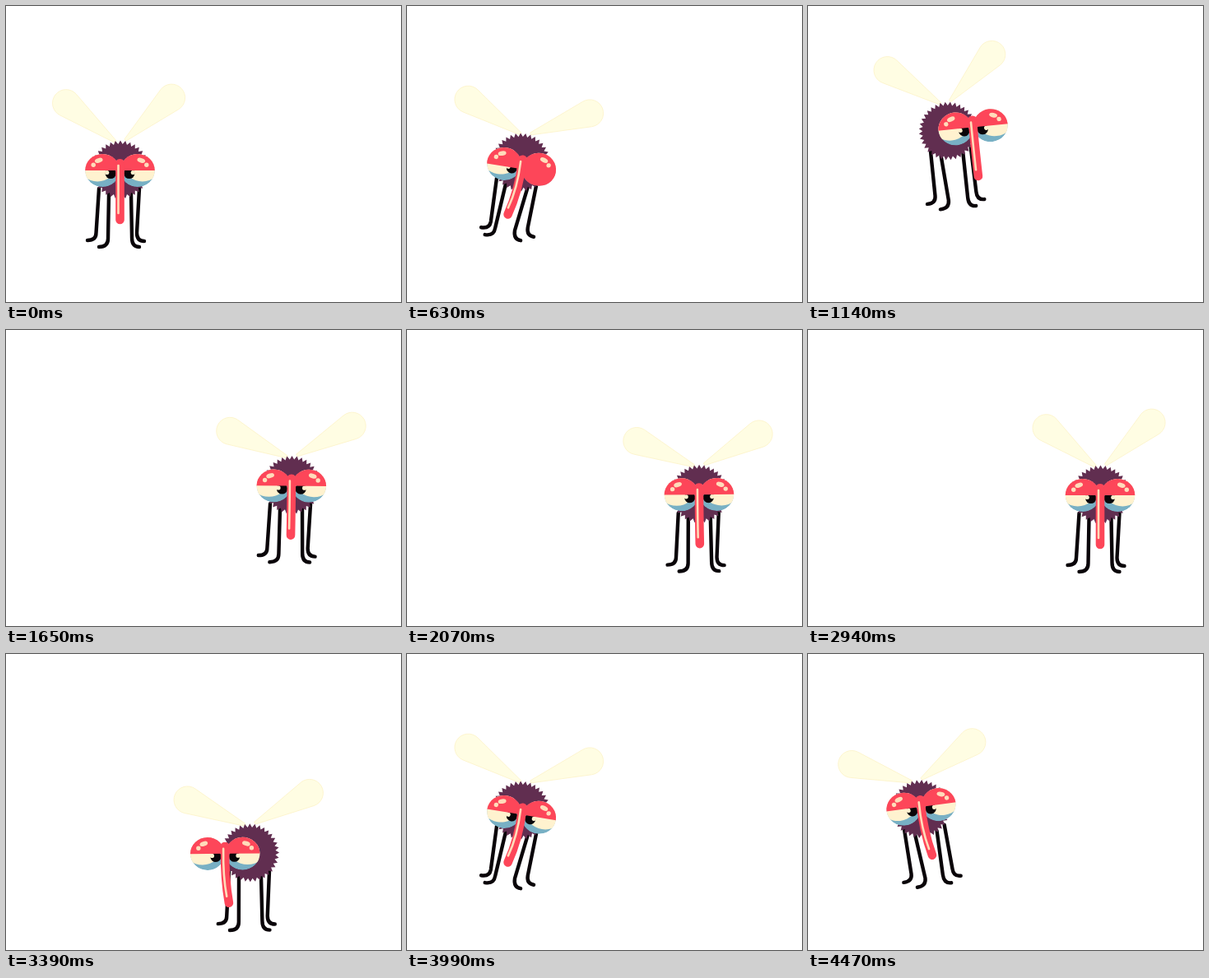
These frames come from a looping animation (480 by 360 pixels, 4.5 s). An HTML page:

```html
<!DOCTYPE html>
<html lang="en">
<head>
<meta charset="utf-8">
<title>Hovering fly</title>
<style>
html, body { margin: 0; width: 100%; height: 100%; overflow: hidden; background: #fff; }
svg { display: block; width: 100vw; height: 100vh; }
</style>
</head>
<body>
<svg viewBox="0 0 480 360">
  <defs>
    <clipPath id="ball"><ellipse rx="21" ry="20"/></clipPath>
    <path id="wing" d="M0 -1.5L73 -16.2A16.5 16.5 0 1 1 73 16.2L0 1.5Z" fill="#fffde3" stroke="#fdf4cb" stroke-width=".8"/>
    <g id="eye">
      <ellipse rx="21" ry="20" fill="#78b0c4"/>
      <ellipse cx="-6" cy="-5" rx="22" ry="18.5" fill="#fff2cf"/>
      <circle cx="10" cy="3.5" r="6.6" fill="#0a0509"/>
      <circle cx="5.5" cy="2.5" r="2.6" fill="#fff2cf"/>
    </g>
    <g id="shine" fill="#ffdcba">
      <ellipse cx="-4.5" cy="-12.2" rx="5" ry="2.8" transform="rotate(-18 -4.5 -12.2)"/>
      <circle cx="-11" cy="-6.8" r="2.7"/>
    </g>
  </defs>
  <g id="fly">
    <use id="wingL" href="#wing"/>
    <use id="wingR" href="#wing"/>
    <path id="legs" fill="none" stroke="#0a0509" stroke-width="4.4" stroke-linecap="round" stroke-linejoin="round"/>
    <path id="body" fill="#612e50"/>
    <g id="face">
      <ellipse cy="-6" rx="7" ry="8" fill="#fd4659"/>
      <g transform="translate(-21.3)">
        <g clip-path="url(#ball)">
          <use href="#eye"/>
          <rect id="lidL" x="-22" y="-21" width="44" height="21" fill="#fd4659"/>
        </g>
        <use href="#shine"/>
      </g>
      <g transform="translate(21.3) scale(-1 1)">
        <g clip-path="url(#ball)">
          <use href="#eye"/>
          <rect id="lidR" x="-22" y="-21" width="44" height="21" fill="#fd4659"/>
        </g>
        <use href="#shine"/>
      </g>
      <path id="nose" fill="none" stroke="#fd4659" stroke-width="10.6" stroke-linecap="round"/>
      <path id="gloss" fill="none" stroke="#ffdcba" stroke-width="2.6" stroke-linecap="round"/>
    </g>
  </g>
</svg>
<script>
const STEP = 30, COUNT = 150, SWAY = 28;
const LEFT = 139, RIGHT = 355.5, GROUND = 199;
const $ = id => document.getElementById(id);
const set = (id, name, value) => $(id).setAttribute(name, value);
const clamp = u => Math.max(0, Math.min(1, u));
const ramp = (n, a, b) => clamp((n - a) / (b - a));
const quad = u => u < .5 ? 2 * u * u : 1 - 2 * (1 - u) * (1 - u);
const sine = u => (1 - Math.cos(Math.PI * u)) / 2;
const bell = (n, a, b, edge) => sine(ramp(n, a, a + edge)) - sine(ramp(n, b - edge, b));

function spikes(count, inner, outer) {
  const points = [];
  for (let i = 0; i < count * 2; i++) {
    const a = Math.PI * i / count - Math.PI / 2, r = i % 2 ? inner : outer;
    points.push((r * Math.cos(a)).toFixed(2) + " " + (r * Math.sin(a)).toFixed(2));
  }
  return "M" + points.join("L") + "Z";
}
set("body", "d", spikes(36, 31, 35.5));

// Eased swing through 0, -1, 0, 1 with a short rest at each
function swing(n) {
  const q = (n % SWAY) / (SWAY / 4), i = Math.floor(q);
  const stops = [0, -1, 0, 1, 0];
  return stops[i] + (stops[i + 1] - stops[i]) * sine(q - i);
}

// Hip, ankle and foot; swaying shifts the foot by spread at both ends and by lean to each side
function leg(k, hx, hy, ax, ay, fx, fy, spread, lean) {
  const hip = hx - 2 * k + 2 * Math.abs(k), s = spread * Math.abs(k) - lean * k;
  return `M${hip} ${hy}Q${(hip + ax + s) / 2} ${(hy + ay) / 2} ${ax + s} ${ay}Q${ax + s} ${fy} ${fx + s} ${fy}`;
}

function draw(ms) {
  const n = Math.floor(ms / STEP) % COUNT;
  const k = swing(n), tilt = Math.abs(k), rot = 9.3 * k;
  const out = quad(ramp(n, 30, 59)), back = quad(ramp(n, 102.5, 131));
  const x = LEFT + (RIGHT - LEFT) * (out - back) + 1.2 * k - 1.7 * tilt;
  const y = GROUND + out - back - 76 * 4 * out * (1 - out) + 54 * 4 * back * (1 - back)
    - 11 * tilt + 2 * k;
  set("fly", "transform", `translate(${x} ${y}) rotate(${rot})`);

  const lift = n % 2 ? 0 : 14;
  set("wingL", "transform", `translate(-6 -34) rotate(${204 + lift})`);
  set("wingR", "transform", `translate(6 -36) rotate(${-28.5 - lift})`);

  set("legs", "d",
    leg(k, -26, 23, -29.5, 77, -40, 86, 7.5, 2.5) +
    leg(k, -14, 29, -15, 84, -26, 94, 4.5, 7.5) +
    leg(k, 13, 29, 14, 83, 23, 94, -2.5, 5.5) +
    leg(k, 23, 23, 20, 77, 29, 87, 6, 5));

  const look = 30 * (bell(n, 30, 54, 6) - bell(n, 104, 127, 7));
  set("face", "transform", `translate(${look - .5 + 2 * tilt} ${1 + .45 * rot})`);
  const bend = -.75 * rot - .13 * look;
  set("nose", "d", `M0 -6Q${-bend * .2} 30 ${bend} 60`);
  set("gloss", "d", `M-2 -6Q${-2 - bend * .2} 27 ${-2 + bend * .85} 52`);

  set("lidR", "height", 21 + 20 * bell(n, 17, 25, 3));
  set("lidL", "height", 21 + 20 * bell(n, 20, 28, 4));
}

const start = performance.now();
function tick() {
  draw(performance.now() - start);
  requestAnimationFrame(tick);
}
draw(0);
requestAnimationFrame(tick);
</script>
</body>
</html>
```
